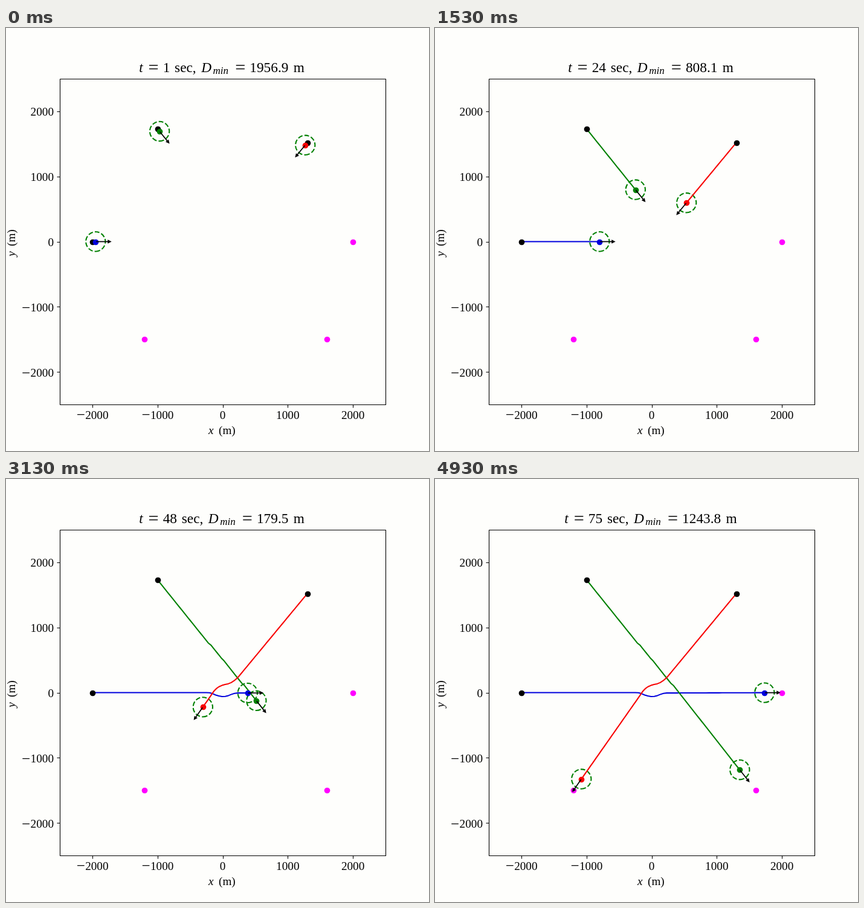
Write an HTML page with a canvas that moves like this. It is 700 px wide and 700 px high and loops after 4990 ms.

```html
<!DOCTYPE html>
<html lang="en">
<head>
<meta charset="utf-8">
<title>Three agents avoiding collision</title>
<style>
html, body { margin: 0; width: 100%; height: 100%; overflow: hidden; background: #fefefc; }
canvas { display: block; }
</style>
</head>
<body>
<canvas id="stage" width="700" height="700"></canvas>
<script>
const ctx = document.getElementById('stage').getContext('2d');
const LOOP = 4990, STEPS = 75, SPEED = 50, SCALE = 0.1078;
const SERIF = '"Liberation Serif", "Times New Roman", serif';
const LABEL = 19.2, TITLE = 23.3;

// Metres, y up. Each turn maps a second to headings in degrees, clockwise from east;
// in every other second an agent heads straight for its goal.
const agents = [
  { color: '#0000dd', start: [-2000, 0], goal: [2000, 0],
    turns: { 36: [3, 17, 23, 17, 10, -2, -15, -22, -17, -7] } },
  { color: '#008000', start: [-1000, 1732.05], goal: [1600, -1500],
    turns: { 26: [38], 32: [45], 42: [40] } },
  { color: '#f80000', start: [1300, 1520], goal: [-1200, -1500],
    turns: { 34: [135, 140, 147, 158, 167, 164, 156, 144, 134, 126, 123] } }
];

const px = x => 358.5 + x * SCALE;
const py = y => 353.5 - y * SCALE;
const snap = v => Math.round(v) + 0.5;

function simulate(agent) {
  const headings = {};
  for (const [first, list] of Object.entries(agent.turns))
    list.forEach((deg, i) => headings[+first + i] = deg * Math.PI / 180);
  let [x, y] = agent.start;
  agent.path = [{ x, y, a: 0 }];
  for (let s = 1; s <= STEPS; s++) {
    const a = headings[s] ?? Math.atan2(y - agent.goal[1], agent.goal[0] - x);
    x += SPEED * Math.cos(a);
    y -= SPEED * Math.sin(a);
    agent.path.push({ x, y, a });
  }
}
agents.forEach(simulate);

function text(str, x, y, size, align = 'left', italic = false) {
  ctx.font = `${italic ? 'italic ' : ''}${size}px ${SERIF}`;
  ctx.textAlign = align;
  ctx.fillText(str, x, y);
}

// Wide maths sign, centred in an advance of 0.778 em
const sign = (str, x, y, size) =>
  text(str, x + size * 0.389, y + size * 0.08, size * 1.3, 'center');

function tickLabel(value, x, y, align) {
  const digits = String(Math.abs(value));
  const full = (digits.length / 2 + (value < 0 ? 0.778 : 0)) * LABEL;
  let left = align === 'right' ? x - full : x - full / 2;
  if (value < 0) {
    sign('−', left, y, LABEL);
    left += 0.778 * LABEL;
  }
  text(digits, left, y, LABEL);
}

function axisLabel(name, x, y) {
  text(name, x - 24, y, LABEL, 'left', true);
  text('(m)', x - 7, y, LABEL);
}

function line(x1, y1, x2, y2) {
  ctx.beginPath();
  ctx.moveTo(x1, y1);
  ctx.lineTo(x2, y2);
  ctx.stroke();
}

function drawAxes() {
  ctx.strokeStyle = ctx.fillStyle = '#000';
  ctx.lineWidth = 1.1;
  ctx.strokeRect(89.5, 84.5, 539, 539);
  for (let v = -2000; v <= 2000; v += 1000) {
    const x = snap(px(v)), y = snap(py(v));
    line(x, 623.5, x, 628.5);
    line(84.5, y, 89.5, y);
    tickLabel(v, px(v), 646.5, 'center');
    tickLabel(v, 79, py(v) + (v < 0 ? 8 : 7), 'right');
  }
  axisLabel('x', 359, 671.5);
  ctx.save();
  ctx.translate(15, 354);
  ctx.rotate(-Math.PI / 2);
  axisLabel('y', 0, 0);
  ctx.restore();
}

function drawTitle(sec, dist) {
  const time = String(sec), value = dist.toFixed(1), y = 73;
  const width = 8.664 + time.length / 2 + (value.length - 1) / 2 + 0.278;
  let x = 359.3 - width * TITLE / 2;
  const put = (str, advance, italic) => {
    text(str, x, y, TITLE, 'left', italic);
    x += advance * TITLE;
  };
  const equals = () => {
    sign('=', x + 0.278 * TITLE, y, TITLE);
    x += 1.334 * TITLE;
  };
  put('t', 0.361, true);
  equals();
  put(time, time.length / 2 + 0.333);
  put('sec,', 1.893);
  put('D', 0.828, true);
  text('min', x, y + 3, TITLE * 0.73, 'left', true);
  x += 1.276 * TITLE;
  equals();
  put(value, (value.length - 1) / 2 + 0.611);
  put('m', 0.833);
}

function dot([x, y], color) {
  ctx.fillStyle = color;
  ctx.beginPath();
  ctx.arc(snap(px(x)), snap(py(y)), 4.85, 0, 7);
  ctx.fill();
}

function drawRing({ x, y }) {
  ctx.strokeStyle = '#008000';
  ctx.lineWidth = 2.08;
  ctx.setLineDash([7.7, 3.33]);
  ctx.beginPath();
  ctx.arc(px(x), py(y), 150 * SCALE, Math.PI / 2, -1.5 * Math.PI, true);
  ctx.stroke();
  ctx.setLineDash([]);
}

function drawTrail(agent, sec) {
  ctx.strokeStyle = agent.color;
  ctx.lineWidth = 2.08;
  ctx.lineJoin = 'round';
  ctx.beginPath();
  agent.path.slice(0, sec + 1).forEach(p => ctx.lineTo(px(p.x), py(p.y)));
  ctx.stroke();
}

function drawArrow({ x, y, a }) {
  ctx.save();
  ctx.translate(px(x), py(y));
  ctx.rotate(a);
  ctx.strokeStyle = ctx.fillStyle = '#000';
  ctx.lineWidth = 1.7;
  line(1, 0, 21, 0);
  ctx.beginPath();
  ctx.moveTo(26.4, 0);
  ctx.lineTo(20, -3.2);
  ctx.lineTo(20, 3.2);
  ctx.fill();
  ctx.restore();
}

function draw(sec) {
  ctx.fillStyle = '#fefefc';
  ctx.fillRect(0, 0, 700, 700);
  drawAxes();

  const now = agents.map(agent => agent.path[sec]);
  const gaps = now.map((p, i) => {
    const q = now[(i + 1) % now.length];
    return Math.hypot(p.x - q.x, p.y - q.y);
  });
  drawTitle(sec, Math.min(...gaps));

  now.forEach(drawRing);
  agents.forEach(agent => drawTrail(agent, sec));
  agents.forEach(agent => {
    dot(agent.start, '#000');
    dot(agent.goal, '#ff00ff');
  });
  agents.forEach((agent, i) => dot([now[i].x, now[i].y], agent.color));
  now.forEach(drawArrow);
}

// 15 steps per second, with switch times rounded to 10 ms
function tick() {
  const ms = Math.floor(performance.now() % LOOP / 10) * 10;
  draw(Math.min(STEPS, 1 + Math.floor((ms + 5) * 0.015)));
  requestAnimationFrame(tick);
}
tick();
</script>
</body>
</html>
```
